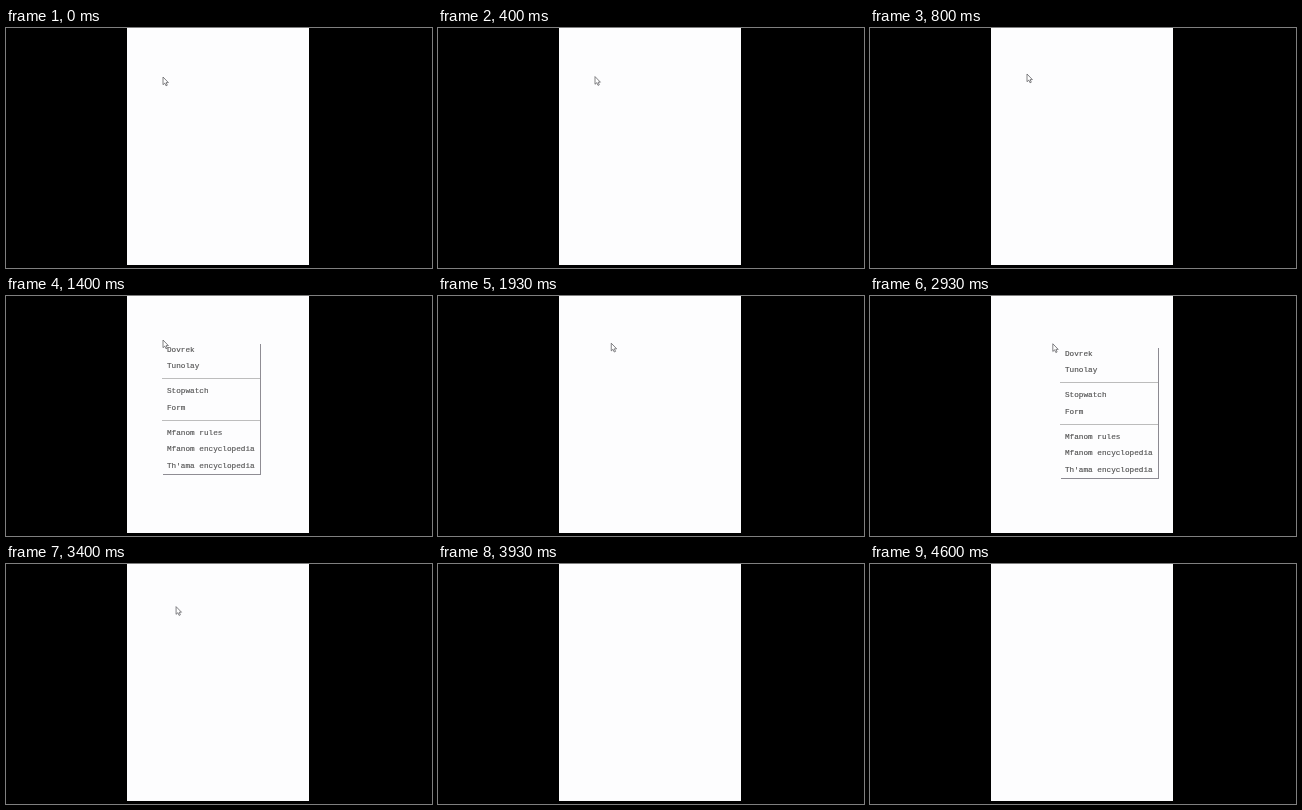
Write an HTML page that moves like this. It is 426 px wide and 240 px high and loops after 4.67 s.

```html
<!DOCTYPE html>
<html lang="en">
<head>
<meta charset="utf-8">
<title>Context menu</title>
<style>
html, body { margin: 0; width: 100%; height: 100%; overflow: hidden; background: #000; }
svg { display: block; width: 100vw; height: 100vh; }
text { font: 7.7px "Liberation Mono", "Courier New", monospace; fill: #505050; stroke: #505050; stroke-width: 0.15; }
</style>
</head>
<body>
<svg id="stage" viewBox="0 0 426 240">
  <defs>
    <filter id="soft" x="-10%" y="-10%" width="120%" height="120%">
      <feGaussianBlur stdDeviation="0.7"/>
    </filter>
  </defs>
  <rect width="426" height="240" fill="#000"/>
  <rect x="121" width="182" height="237" fill="#fdfdfe"/>
  <g id="menu">
    <rect x="1" y="1" width="98" height="131" fill="#8c8a92" filter="url(#soft)"/>
    <rect width="98" height="131" fill="#fdfdfe"/>
    <rect id="hover" y="1" width="98" height="14" fill="#efe4f3"/>
    <g id="items"></g>
  </g>
  <g id="arrow">
    <path d="M0 0V7.7L1.8 6.1L3 8.8L4.3 8.2L3.1 5.6H5.4Z" fill="#fff" stroke="#626266" stroke-width="0.8" stroke-linejoin="round"/>
  </g>
  <g id="hand">
    <path d="M0 0.7Q0.8 -0.4 1.6 0.7V3.8L5 4.6Q6 5 5.8 6.3L5 10H1.1L-1.9 6.6Q-2.1 5.2 -0.9 5.6L0 6.4Z" fill="#fff" stroke="#626266" stroke-width="0.9" stroke-linejoin="round"/>
  </g>
</svg>
<script>
const LOOP = 4670, FRAMES = 70;
const NS = "http://www.w3.org/2000/svg";
const $ = id => document.getElementById(id);

const rows = [
  ["Dovrek", 9], ["Tunolay", 25.4], ["Stopwatch", 50.4], ["Form", 66.8],
  ["Mfanom rules", 91.8], ["Mfanom encyclopedia", 108.2], ["Th'ama encyclopedia", 124.6]
];
const rules = [35, 77];

// time, x, y of the pointer tip
const path = [
  [0, 157, 49], [530, 157, 48.5], [800, 157, 46], [1130, 157, 44], [1670, 157, 44],
  [2070, 190, 50.5], [2600, 191, 50.5], [2930, 182, 47.5], [3270, 172, 45],
  [3530, 160, 30], [3800, 148, -12]
];

// opening and closing times, position
const menus = [
  { from: 1130, to: 1730, x: 156, y: 47 },
  { from: 2260, to: 3330, x: 190, y: 51 }
];
const HOVER = [2330, 2730];

function add(tag, attrs, label) {
  const el = document.createElementNS(NS, tag);
  for (const key in attrs) el.setAttribute(key, attrs[key]);
  if (label) el.textContent = label;
  $("items").append(el);
}

rows.forEach(([label, y]) => add("text", { x: 5, y }, label));
rules.forEach(y => add("rect", { y, width: 98, height: 1, fill: "#bcbcbc" }));

const clamp = v => Math.max(0, Math.min(1, v));
const ease = v => v * v * (3 - 2 * v);
const within = (t, a, b) => t >= a && t < b;

function pointer(t) {
  const i = path.findIndex(p => p[0] > t);
  if (i < 0) return null;
  const [a, b] = [path[i - 1], path[i]];
  const k = ease((t - a[0]) / (b[0] - a[0]));
  return [a[1] + (b[1] - a[1]) * k, a[2] + (b[2] - a[2]) * k];
}

function show(id, on) {
  $(id).setAttribute("visibility", on ? "visible" : "hidden");
}

function place(id, x, y) {
  $(id).setAttribute("transform", `translate(${x} ${y})`);
}

function draw(t) {
  const open = menus.find(m => within(t, m.from, m.to));
  const over = within(t, ...HOVER);
  const tip = pointer(t);

  show("menu", open);
  show("hover", open && over);
  if (open) {
    place("menu", open.x, open.y);
    $("menu").setAttribute("opacity", clamp((t - open.from + 70) / 350));
  }
  show("arrow", tip && !over);
  show("hand", tip && over);
  if (tip) {
    place("arrow", ...tip);
    place("hand", ...tip);
  }
}

const start = performance.now();
function tick() {
  const t = (performance.now() - start) % LOOP;
  const step = LOOP / FRAMES;
  draw(Math.floor(t / step) * step);
  requestAnimationFrame(tick);
}
tick();
</script>
</body>
</html>
```
